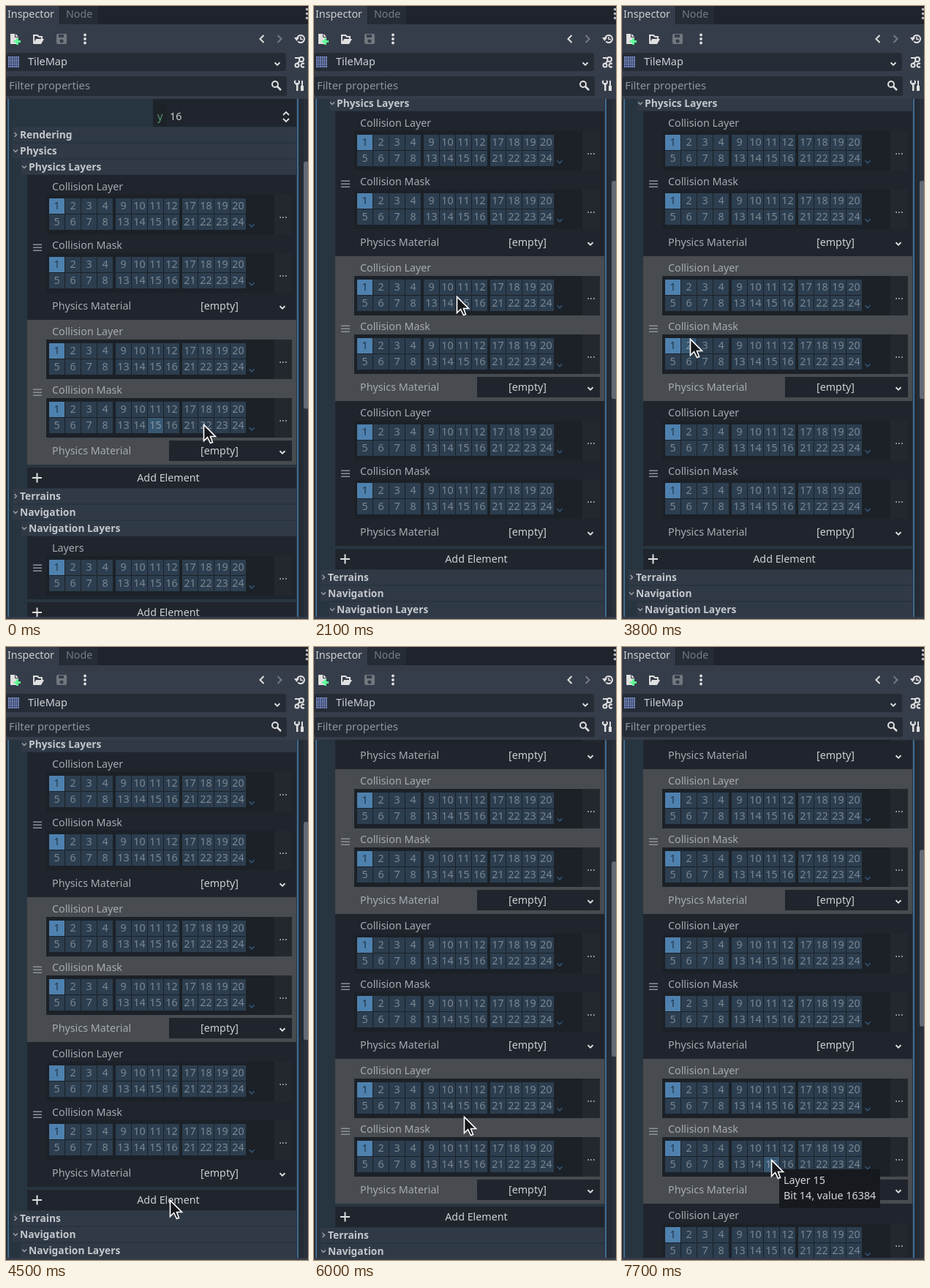
These frames come from a looping animation (413x838 px, 8000 ms). An HTML page with a canvas:

```html
<!DOCTYPE html>
<html>
<head>
<meta charset="utf-8">
<style>
html, body { margin: 0; width: 100%; height: 100%; overflow: hidden; background: #363d4a; }
canvas { display: block; }
</style>
</head>
<body>
<canvas id="stage" width="413" height="838"></canvas>
<script>
const ctx = document.getElementById('stage').getContext('2d');
const LOOP = 8000, STEP = 100;
const TOP = 127, VIEW = 708, ELEMENT = 198, BASE_SCROLL = 179, NOTCH = 87.4;
const PANEL = '#363d4a', FIELD = '#262c36', DARK = '#20252d', LIGHT = '#484b4f';
const TEXT = '#cdcfd2', DIM = '#a6abb2', ICON = '#e0e0e0', BORDER = '#426b8f';

const additions = [2100, 4800, 7100];
const tooltips = [[5400, 5600], [7700, 8000]];

// pointer glides after the opening circle: start, end, x, y
const glides = [
  [900, 1200, 225, 641], [1500, 1800, 195, 397], [3200, 3600, 93, 455],
  [3800, 4500, 224, 756], [4800, 5300, 208, 493], [5400, 5500, 205, 519],
  [5600, 5900, 205, 642], [6000, 6600, 225, 768], [7100, 7600, 204, 701]
];

function circling(t) {
  const angle = 1.2 - t / 900 * 2 * Math.PI;
  return { x: 235 + 96 * Math.cos(angle), y: 438 + 144 * Math.sin(angle) };
}

function pointerAt(t) {
  const p = circling(Math.min(t, 900));
  for (const [start, end, x, y] of glides) {
    const k = Math.min(1, Math.max(0, (t - start) / (end - start)));
    const ease = k * k * (3 - 2 * k);
    p.x += (x - p.x) * ease;
    p.y += (y - p.y) * ease;
  }
  return { x: Math.round(p.x), y: Math.round(p.y) };
}

function scrollAt(t) {
  const notches = (t >= 2100) - (t >= 3100) + (t >= 3800) + (t >= 5700) + (t >= 5800);
  return BASE_SCROLL + Math.floor(NOTCH * notches);
}

function rect(x, y, w, h, color) {
  ctx.fillStyle = color;
  ctx.fillRect(x, y, w, h);
}

function rounded(x, y, w, h, r, color) {
  ctx.fillStyle = color;
  ctx.beginPath();
  ctx.roundRect(x, y, w, h, r);
  ctx.fill();
}

// y is the middle of the letters
function text(s, x, y, color = TEXT, size = 14.3, align = 'left', weight = 400) {
  ctx.font = `${weight} ${size}px "Noto Sans", sans-serif`;
  ctx.textAlign = align;
  ctx.fillStyle = color;
  ctx.fillText(s, x, y + 5);
}

function line(points, color = ICON, width = 2) {
  ctx.strokeStyle = color;
  ctx.lineWidth = width;
  ctx.beginPath();
  for (const [x, y] of points) ctx.lineTo(x, y);
  ctx.stroke();
}

function shape(points, color = ICON) {
  ctx.fillStyle = color;
  ctx.beginPath();
  for (const [x, y] of points) ctx.lineTo(x, y);
  ctx.closePath();
  ctx.fill();
}

function disc(x, y, r, color = ICON) {
  ctx.fillStyle = color;
  ctx.beginPath();
  ctx.arc(x, y, r, 0, 7);
  ctx.fill();
}

function ring(x, y, r, from = 0, to = 7) {
  ctx.strokeStyle = ICON;
  ctx.lineWidth = 2;
  ctx.beginPath();
  ctx.arc(x, y, r, from, to);
  ctx.stroke();
}

// a negative r points up
function chevron(x, y, r, color = ICON, width = 1.8) {
  line([[x - r, y - r / 2], [x, y + r / 2], [x + r, y - r / 2]], color, width);
}

// a negative r points left
function sideChevron(x, y, r, color = ICON, width = 2) {
  line([[x - r / 2, y - r], [x + r / 2, y], [x - r / 2, y + r]], color, width);
}

function dots(x, y, gap, r, color = ICON) {
  for (const i of [-1, 0, 1]) disc(x, y + i * gap, r, color);
}

function inside(p, x, y, w, h) {
  return p && p.x >= x && p.x < x + w && p.y >= y && p.y < y + h;
}

function header(label, x, y, open = true) {
  rect(x - 10, y - 10, 407 - x, 20, '#303a46');
  (open ? chevron : sideChevron)(x - 6, y, 3, '#9aa2ab', 1.5);
  text(label, x, y, '#c3c7cc', 13.8, 'left', 700);
}

function layerGrid(y, hover) {
  rect(55, y, 336, 54, '#1c2128');
  rect(367, y, 24, 54, '#23282f');
  for (let i = 0; i < 24; i++) {
    const group = i >> 3, col = group * 4 + i % 4;
    const x = 59 + col * 22 + group * 3;
    const cy = y + 5 + (i >> 2 & 1) * 22;
    const over = inside(hover, x, cy, 21, 21);
    rect(x, cy, 21, 21, i === 0 ? '#4e81ae' : over ? '#375872' : '#2c3e4f');
    text(i + 1, x + 10.5, cy + 10, i === 0 ? '#20364a' : over ? '#8798a6' : '#7b8792', 14.3, 'center');
  }
  chevron(336, y + 42, 3.5, '#345571', 1.6);
  text('...', 379, y + 27, '#b9bdc2', 14.3, 'center');
}

function handle(y) {
  for (const d of [-4, 0, 4]) rect(37, y + d - .5, 12, 1.5, '#8d9299');
}

function element(y, light, hover) {
  rect(29, y, 368, ELEMENT, light ? LIGHT : DARK);
  text('Collision Layer', 63, y + 16, DIM);
  layerGrid(y + 27, hover);
  text('Collision Mask', 63, y + 96, DIM);
  layerGrid(y + 107, hover);
  handle(y + 99);
  text('Physics Material', 63, y + 179, DIM);
  rect(223, y + 165, 168, 28, DARK);
  text('[empty]', 292, y + 179, TEXT, 14.3, 'center');
  chevron(378, y + 181, 3.5);
}

function addButton(y, hover, pressing) {
  const over = inside(hover, 29, y, 368, 28), pressed = over && pressing;
  rect(29, y, 368, 28, pressed ? '#1b1f26' : over ? '#2a303a' : DARK);
  rect(36, y + 13, 13, 2, ICON);
  rect(41.5, y + 7.5, 2, 13, ICON);
  text('Add Element', 222, y + 14, pressed ? '#70bafa' : over ? '#eceef0' : TEXT, 14.3, 'center');
}

function content(scroll, count, hover, pressing) {
  ctx.save();
  ctx.beginPath();
  ctx.rect(0, TOP, 413, VIEW);
  ctx.clip();
  rect(0, TOP, 413, VIEW, '#242b34');
  rect(2, TOP, 397, VIEW, '#273540');
  rect(2, TOP, 2, VIEW, BORDER);
  rect(398, TOP, 2, VIEW, BORDER);

  const top = BASE_SCROLL - scroll;
  rect(201, top + 106, 196, 59, DARK);
  rect(201, top + 135, 19, 30, '#1d2229');
  text('y', 207, top + 151, '#5f9a6e');
  text('16', 224, top + 151);
  chevron(383, top + 147, -4);
  chevron(383, top + 156, 4);

  header('Rendering', 19, top + 176, false);
  header('Physics', 19, top + 198);
  header('Physics Layers', 31, top + 220);
  const list = top + 231;
  for (let i = 0; i < count; i++) element(list + i * ELEMENT, i % 2 === 1, hover);

  const end = list + count * ELEMENT;
  addButton(end + 4, hover, pressing);
  header('Terrains', 19, end + 43, false);
  header('Navigation', 19, end + 65);
  header('Navigation Layers', 31, end + 87);
  rect(29, end + 98, 368, 86, DARK);
  text('Layers', 63, end + 114, DIM);
  layerGrid(end + 125, hover);
  handle(end + 141);
  addButton(end + 188);

  const ratio = VIEW / (1087 + count * ELEMENT);
  rect(407, TOP, 6, VIEW, '#2a3039');
  rounded(407, TOP + scroll * ratio, 7, VIEW * ratio, 3, '#646a73');
  ctx.restore();
}

function tabs() {
  rect(0, 0, 413, 25, '#1f242c');
  rect(74, 0, 52, 25, '#262c35');
  rect(0, 0, 73, 25, PANEL);
  text('Inspector', 2, 11);
  text('Node', 82, 11, '#767c85');
  dots(411.5, 10.5, 6, 1.8, '#b5b9be');
}

function toolbar() {
  // new resource
  rect(6, 38, 6, 14, ICON);
  rect(12, 43, 5, 9, ICON);
  shape([[13, 38], [17, 42], [13, 42]]);
  rect(11, 47, 9, 3, '#5fff97');
  rect(14, 44, 3, 9, '#5fff97');
  // open
  line([[38, 51], [38, 40], [43, 40], [45, 42], [49, 42], [49, 45]]);
  shape([[37, 52], [41, 45], [52, 45], [48, 52]]);
  // save
  rounded(69, 38, 14, 14, 2, '#73787f');
  rect(72, 39, 7, 4, PANEL);
  disc(76, 48, 2.5, PANEL);

  dots(108, 45, 5.5, 1.9);
  sideChevron(350, 45, -5);
  sideChevron(374, 45, 5, '#747a83');
  // history
  ring(403, 45, 5, -2.8, 2.4);
  shape([[394, 43], [401, 43], [397.5, 48]]);
  line([[403, 42], [403, 45.5], [406, 45.5]], ICON, 1.5);
}

function fields() {
  rounded(0, 64, 383, 25, 3, FIELD);
  for (let i = 0; i < 36; i++) rect(3 + i % 6 * 2.6, 69 + (i / 6 | 0) * 2.6, 1.8, 1.8, '#8da5f3');
  text('TileMap', 30, 76, TEXT, 14.5);
  chevron(371, 79, 3.5);

  // documentation
  ring(404, 73, 3);
  line([[395, 71], [401, 71]]);
  line([[402, 75], [398, 79]]);
  ring(398, 81, 2.5);
  ring(406, 81, 2.5, .8, 5.5);

  rounded(0, 96, 384, 27, 3, FIELD);
  text('Filter properties', 4, 109, '#8f959d', 14.8);
  ring(368, 107, 4);
  line([[371, 110], [376, 115]], ICON, 2.5);

  // object tools
  rect(397, 105, 2.5, 11, ICON);
  ring(398, 104, 3, -.8, 3.9);
  rect(404, 102, 2, 7, ICON);
  rect(403, 109, 4, 7, ICON);
}

function tooltip({ x, y }) {
  rounded(x + 11, y + 13, 138, 53, 3, '#16191d');
  text('Layer 15', x + 17, y + 28, '#d6d9dc');
  text('Bit 14, value 16384', x + 17, y + 49, '#d6d9dc');
}

function pointer({ x, y }) {
  ctx.save();
  ctx.translate(x + .5, y + .5);
  shape([[0, 0], [0, 22], [5, 17], [9, 25], [12, 24], [9, 16], [16, 16]], '#15171a');
  ctx.strokeStyle = '#fff';
  ctx.lineWidth = 1.6;
  ctx.stroke();
  ctx.restore();
}

function draw(now) {
  const t = Math.floor(now % LOOP / STEP) * STEP;
  // hover trails the pointer by one step and ignores wheel scrolling
  const hover = t > 1800 && t < 3300 ? null : pointerAt(t - STEP);
  const count = 2 + additions.filter(a => t >= a).length;
  const pressing = additions.some(a => t >= a - 200 && t < a);
  rect(0, 0, 413, 838, PANEL);
  tabs();
  toolbar();
  fields();
  content(scrollAt(t), count, hover, pressing);
  for (const [from, to] of tooltips) if (t >= from && t < to) tooltip(pointerAt(from));
  pointer(pointerAt(t));
}

let start;
function frame(now) {
  start ??= now;
  draw(Math.max(0, now - start));
  requestAnimationFrame(frame);
}
draw(0);
requestAnimationFrame(frame);
</script>
</body>
</html>
```
